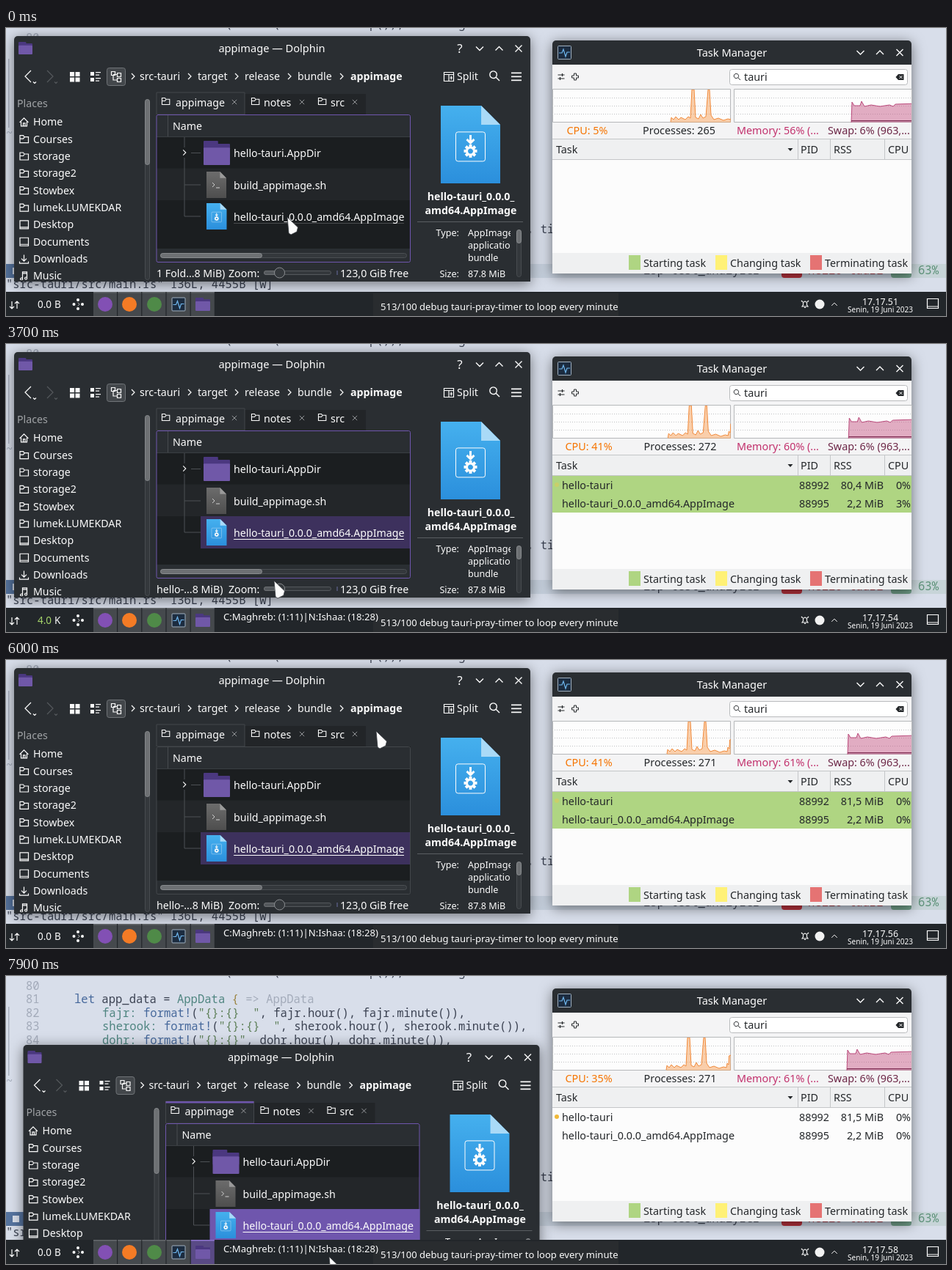
Animation of 1280x393 px, one loop 8000 ms. Source, as an HTML page with a canvas:

```html
<!DOCTYPE html>
<html lang="en">
<head>
<meta charset="utf-8">
<title>Prayer timer on the desktop</title>
<style>
html, body { margin: 0; width: 1280px; height: 393px; overflow: hidden; }
canvas { display: block; }
</style>
</head>
<body>
<canvas id="stage" width="1280" height="393"></canvas>
<script>
const g = document.getElementById('stage').getContext('2d');
const LOOP = 8000, STEP = 100;
const WHITE = '#fcfcfc', INK = '#232629', DARK = '#2a2e32', ACCENT = '#6f56ad';

// ---- drawing helpers ----
function rect(x, y, w, h, fill, stroke, r = 0) {
  g.beginPath();
  g.roundRect(x, y, w, h, r);
  if (fill) { g.fillStyle = fill; g.fill(); }
  if (stroke) { g.strokeStyle = stroke; g.lineWidth = 1; g.stroke(); }
}
function circle(x, y, r, fill, stroke) { rect(x - r, y - r, 2 * r, 2 * r, fill, stroke, r); }
function path(d, x, y, stroke, fill, w = 1.2, scale = 1) {
  const p = new Path2D(d);
  g.save();
  g.translate(x, y);
  g.scale(scale, scale);
  if (fill) { g.fillStyle = fill; g.fill(p); }
  if (stroke) { g.strokeStyle = stroke; g.lineWidth = w; g.stroke(p); }
  g.restore();
}
function text(s, x, y, color = WHITE, size = 14.2, align = 'left', weight = 400, family = '"Noto Sans", sans-serif') {
  g.font = `${weight} ${size}px ${family}`;
  g.textAlign = align;
  g.fillStyle = color;
  g.fillText(s, x, y);
}
function clipped(x, y, w, h, draw) {
  g.save();
  g.beginPath();
  g.rect(x, y, w, h);
  g.clip();
  draw();
  g.restore();
}
function windowFrame(x, y, w, h, fill) {
  g.save();
  g.shadowColor = 'rgba(0,0,0,.5)';
  g.shadowBlur = 18;
  g.shadowOffsetY = 3;
  rect(x, y, w, h, fill, null, [5, 5, 0, 0]);
  g.restore();
}
function polyline(pts, shift, base, stroke, fill) {
  g.beginPath();
  pts.forEach(([x, y]) => g.lineTo(x - shift, y));
  g.strokeStyle = stroke;
  g.lineWidth = 1;
  g.stroke();
  g.lineTo(pts.at(-1)[0] - shift, base);
  g.lineTo(pts[0][0] - shift, base);
  g.fillStyle = fill;
  g.fill();
}

// ---- timing helpers ----
function tween(keys, t) {
  const i = keys.findIndex(k => k[0] > t);
  if (i === 0) return keys[0].slice(1);
  if (i < 0) return keys.at(-1).slice(1);
  const a = keys[i - 1], b = keys[i], f = (t - a[0]) / (b[0] - a[0]);
  return [1, 2].map(n => a[n] + (b[n] - a[n]) * f);
}
const latest = (rows, t) => rows.findLast(r => r[0] <= t);

const POINTER = [[400, 383, 258], [1000, 366, 241], [3600, 366, 241], [3700, 365, 323], [4200, 372, 371],
  [5500, 372, 371], [6000, 504, 97], [6400, 488, 24], [7400, 498, 108], [7900, 440, 383]];
const DRAG = [[6800, 0, 0], [6900, 0, 14.5], [7300, 12.5, 83]];
// time, CPU %, processes, memory %, graph scroll
const LOAD = [[0, 5, 265, 56, 0], [800, 13, 266, 60, 1.5], [2000, 27, 269, 60, 2.5], [3100, 41, 272, 60, 3.7],
  [4500, 38, 272, 60, 4.4], [5200, 38, 272, 60, 4.8], [5900, 41, 271, 61, 5], [6800, 35, 271, 61, 5.4], [7500, 35, 271, 61, 6]];
const CPU = [[905, 128], [906, 122], [909, 125], [912, 121], [916, 125], [919, 122], [925, 125], [929, 121], [932, 123],
  [934, 84], [937, 84], [939, 122], [943, 124], [946, 118], [949, 123], [953, 121], [956, 84], [958, 84], [960, 119],
  [964, 125], [970, 123], [977, 126], [983, 124], [987, 125], [988, 119], [990, 121], [990.5, 109], [993, 108]];
const MEMORY = [[1151, 129], [1152, 101], [1155, 106], [1163, 106], [1165, 100], [1169, 107], [1178, 105],
  [1190, 107], [1203, 105], [1208, 107], [1211, 104], [1242, 103]];
const NOTE = 'C:Maghreb: (1:11)|N:Ishaa: (18:28)';
const TIMES = ['4:20   fajr', '5:35   sherook', '11:24 dohr', '14:44 asr', '17:13 maghreb', '18:28 ishaa'];

// ---- icons ----
const FOLDER = 'M.5 10.5V.5H5L6.5 2.5H12V10.5ZM.5 5H5L6.5 3';
const PLACES = [
  ['Home', 'M0 6L6 0L12 6M2 5V11H10V5M5 11V7H7.500V11'], ['Courses', FOLDER], ['storage', FOLDER], ['storage2', FOLDER],
  ['Stowbex', FOLDER], ['lumek.LUMEKDAR', FOLDER], ['Desktop', 'M.5 0H12V11H.5ZM.5 9H12'], ['Documents', 'M.5 0H12V11H.5ZM.5 9H12'],
  ['Downloads', 'M6 0V8M2.500 5L6 8.500L9.500 5M0 9V11.500H12V9'], ['Music', 'M4 9V0H10V8M4 2H10M4 9A1.500 1.500 0 1 1 3.900 8.800M10 8A1.500 1.500 0 1 1 9.900 7.800']];
const DOWN = 'M-5 -2.500L0 2.500L5 -2.500', UP = 'M-5 2.500L0 -2.500L5 2.500', RIGHT = 'M-2 -4L2 0L-2 4';
const CROSS = 'M-4.500 -4.500L4.500 4.500M4.500 -4.500L-4.500 4.500';
const LENS = 'M1 1L5 5M2 -2A4 4 0 1 1 1.990 -2.200';

function purpleFolder(x, y, w, h) {
  rect(x, y, w * .55, h * .4, '#4b3880', null, 1);
  rect(x, y + h * .12, w, h * .5, '#4b3880', null, 1);
  rect(x, y + h * .28, w, h * .72, '#7058a8', null, 1);
}
function document_(x, y, w, h, top, bottom, fold) {
  const f = w * .32, c = g.createLinearGradient(0, 0, 0, h);
  c.addColorStop(0, top);
  c.addColorStop(1, bottom);
  path(`M0 0H${w - f}L${w} ${f}V${h}H0Z`, x, y, null, c);
  path(`M${w - f} 0V${f}H${w}Z`, x, y, null, fold);
}
function packageIcon(x, y, w) {
  document_(x, y, w, w * 1.31, '#45b0ee', '#2b8fdc', '#a9daf7');
  g.save();
  g.translate(x + w / 2, y + w * .69);
  g.scale(w / 81, w / 81);
  rect(-20, -20, 40, 40, null, WHITE, 3);
  path('M0 -16V-7M-5 -10L0 -5L5 -10', 0, 0, WHITE, null, 3);
  for (let i = 0; i < 8; i++) {
    g.save();
    g.translate(0, 6);
    g.rotate(i * Math.PI / 4);
    rect(-2, -9, 4, 5, WHITE);
    g.restore();
  }
  path('M5 0A5 5 0 1 1 4.990 -.2', 0, 6, WHITE, null, 3);
  g.restore();
}
function pulseIcon(x, y) {
  rect(x + .5, y + .5, 18, 18, '#1c2c40', '#9fb0c0', 1);
  path('M2 10H6L8 5L11 15L13 9H17', x, y, '#6fb7ee');
}
function titleButtons(xs, y) {
  [DOWN, UP, CROSS].forEach((d, i) => path(d, xs[i], y, WHITE, null, 1.4));
}

// ---- scene parts ----
function editor() {
  const CELL = 9.33, mono = '"Noto Sans Mono", monospace';
  const code = (x, y, ...runs) => runs.forEach(([s, c]) => {
    text(s, x, y, c, 15.55, 'left', 400, mono);
    x += s.length * CELL;
  });
  const ink = '#3b4252', num = '#a3abba', field = '#4f8580', macro = '#46689b', str = '#5d7f58';
  rect(0, 0, 1280, 393, '#d8deea');
  code(299, -.5, ['(      (             p());        g', ink]);
  for (let n = 80; n < 85; n++) code(27, 18.500 + (n - 80) * 18.600, [String(n), num]);
  code(93, 37, ['let ', macro], ['app_data = ', ink], ['AppData ', field], ['{ ', '#9a8340'], ['=> AppData', num]);
  ['fajr', 'sherook', 'dohr'].forEach((name, i) =>
    code(131, 55.700 + i * 18.600, [name + ': ', field], ['format!', macro], ['(', ink], [i < 2 ? '"{}:{}  "' : '"{}:{}"', str],
      [`, ${name}.hour(), ${name}.minute()),`, ink]));
  rect(3, 42, 1.500, 94, '#a9b0bf');
  code(0, 149, ['~', num]);
  code(709, 280, [', time', ink]);
  rect(0, 322, 1280, 19, '#c5cfdc');
  rect(0, 322, 26, 19, '#56749f');
  rect(9, 327, 9, 9, '#d8deea');
  code(868, 336, ['lsp test_analyzer', ink]);
  rect(1056, 322, 28, 19, '#b5313c', null, 4);
  code(1092, 336, ['hello-tauri', '#9b3540']);
  rect(1205, 322, 28, 19, '#6f9c87', null, 4);
  rect(1233, 322, 47, 19, '#c7d4d8');
  code(1242, 336, ['63%', '#5d9279']);
  code(0, 355, ['"src-tauri/src/main.rs" 136L, 4455B [w]', ink]);
}

function fileManager(t, active) {
  const accent = active ? ACCENT : '#6d7073', selected = t >= 1300, hovered = t >= 600 && t < 3700;
  windowFrame(11, 11, 703, 335, DARK);
  purpleFolder(17, 19, 19, 17);
  text('appimage — Dolphin', 362, 33, WHITE, 14.6, 'center');
  text('?', 618, 34, WHITE, 17, 'center');
  titleButtons([645, 671.500, 698], 28);

  path('M4 -8L-4 0L4 8', 30, 66, WHITE);
  path('M-4 -8L4 0L-4 8', 60, 66, '#55595d');
  path('M-2 -1L0 1L2 -1', 39, 74.500, WHITE);
  path('M-2 -1L0 1L2 -1', 68, 74.500, '#55595d');
  for (const [x, y] of [[87, 60], [94.500, 60], [87, 67.500], [94.500, 67.500]]) rect(x, y, 6, 6, WHITE);
  for (const y of [60, 68]) {
    rect(115, y, 5, 5, WHITE);
    rect(122, y, 7, 1.200, WHITE);
    rect(122, y + 3.500, 5, 1.200, WHITE);
  }
  rect(137.500, 54.500, 25, 24, '#43474b', '#707478', 3);
  path('M0 0H5V5H0ZM8 2H13V7H8ZM8 9H13V14H8ZM2.500 5V11.500H8M2.500 4H8', 143.500, 59.500, WHITE);
  for (const x of [173, 250, 314, 386, 457]) path(RIGHT, x, 66, WHITE);
  [['src-tauri', 182], ['target', 261], ['release', 325], ['bundle', 397]].forEach(([s, x]) => text(s, x, 71));
  text('appimage', 469, 71, WHITE, 14.2, 'left', 700);
  path('M0 0H13V12H0ZM0 3H13M6.500 3V12M9.800 5V10M8 7.500H11.500', 596.500, 60.500, WHITE);
  text('Split', 614, 71);
  path(LENS, 666, 66, WHITE, null, 1.2, 1.2);
  for (const y of [60.500, 65.500, 70.500]) rect(688, y, 14, 1.700, WHITE);

  clipped(11, 88, 178, 256, () => {
    text('Places', 15, 108, '#a0a3a6');
    PLACES.forEach(([name, icon], i) => {
      const y = 128.300 + i * 23.350;
      path(icon, 18.500, y - 5.500, WHITE);
      text(name, 37, y + 5);
    });
  });
  rect(189.500, 97.500, 6, 246, '#34383c', '#484c50', 3);
  rect(189.500, 97.500, 6, 89, '#6d7073', '#85888b', 3);

  rect(325, 90, 165, 28, '#222528');
  rect(205, 88, 120, 30, DARK, '#43474b');
  if (active) rect(205, 88, 120, 2.500, ACCENT);
  [['appimage', 212, 231, 311], ['notes', 334, 351, 403], ['src', 425, 442, 475]].forEach(([s, icon, x, close]) => {
    path(FOLDER, icon, 95, WHITE, null, 1.2, .9);
    text(s, x, 107);
    path(CROSS, close, 101, '#a0a3a6', null, 1.3, .7);
  });

  rect(205, 118, 346, 202, '#1b1e20');
  rect(205, 119, 346, 29, DARK);
  rect(220, 119, 1, 29, '#484c50');
  rect(205, 148, 346, 1, '#3a3e42');
  text('Name', 227, 139);
  rect(205, 191.500, 346, 43.500, '#232629');
  if (selected) rect(265, 235, 286, 44, active ? ACCENT : '#3d315d');
  rect(205, 301, 346, 19, DARK);
  path('M243 149V163M243 177V257H265M243 214H265M252 170.500H265', 0, 0, '#4d5155', null, 1);
  path(RIGHT, 243, 170, WHITE, null, 1.2, .9);
  purpleFolder(269, 154, 36, 33);
  document_(273, 196, 27, 36, '#6c6c6c', '#4e4e4e', '#9a9a9a');
  path('M0 0L3 3L0 6M5 7H10', 281, 211, '#d0d0d0', null, 1);
  packageIcon(273, 239, 27.500);
  if (selected && active && hovered) {
    rect(273, 239, 27.500, 36, 'rgba(255,255,255,.22)');
    rect(267, 239, 18, 16, 'rgba(120,135,150,.85)', null, 2);
    rect(271, 246, 10, 1.500, WHITE);
  }
  text('hello-tauri.AppDir', 310, 176);
  text('build_appimage.sh', 310, 219.500);
  text('hello-tauri_0.0.0_amd64.AppImage', 310, 263);
  rect(310, 266, 232, 1, selected ? WHITE : 'rgba(255,255,255,.2)');
  rect(210.500, 307.500, 335, 6, '#34383c', '#4b4f53', 3);
  rect(210.500, 307.500, 138, 6, active ? ACCENT : '#6d7073', active ? '#8a72c6' : '#898c8f', 3);
  rect(205, 118.500, 345.500, 201, null, active || t < 3800 ? ACCENT : '#43474b', 2);

  text(t < 600 ? '1 Fold...8 MiB)' : 'hello-...8 MiB)', 205, 340);
  text('Zoom:', 303, 340);
  rect(351.500, 331.500, 91, 5, '#34383c', '#54585c', 3);
  rect(351.500, 331.500, 18, 5, active ? ACCENT : '#54585c', accent, 3);
  circle(372.500, 334, 7, '#34383c', '#8a8d90');
  rect(450, 331, 2, 6, '#4a4e6a');
  text('123,0 GiB free', 455, 340);

  packageIcon(592, 106, 81);
  text('hello-tauri_0.0.0_', 633, 235, WHITE, 14.2, 'center', 700);
  text('amd64.AppImage', 633, 254, WHITE, 14.2, 'center', 700);
  rect(560, 264, 144, 1, '#5a5e62');
  clipped(560, 266, 127, 74, () => {
    text('Type:', 617, 284, WHITE, 12.6, 'right');
    ['AppImage', 'application', 'bundle'].forEach((s, i) => text(s, 629, 284 + i * 17, WHITE, 12.6));
    text('Size:', 617, 340, WHITE, 12.6, 'right');
    text('87.8 MiB', 629, 340, WHITE, 12.6);
  });
  rect(695.500, 275.500, 6, 64, '#34383c', '#484c50', 3);
  rect(695.500, 275.500, 6, 18, '#6d7073', '#898c8f', 3);
}

function taskManager(t) {
  const [, cpu, processes, memory, shift] = latest(LOAD, t), S = 14.35;
  windowFrame(744, 17, 489, 318, DARK);
  rect(744, 50, 489, 285, '#f4f4f5');
  pulseIcon(751, 24);
  text('Task Manager', 988.500, 39, WHITE, 14.6, 'center');
  titleButtons([1163.500, 1190, 1217], 33.500);
  path('M0 2H9M6 0V4M0 7H9M3 5V9', 751.500, 62, INK);
  path('M3 0H6V3H9V6H6V9H3V6H0V3H3Z', 770.500, 62, INK, null, 1);
  rect(985.500, 56.500, 242, 21, '#fff', '#b9bbbd', 3);
  path(LENS, 996, 67, INK, null, 1.2, .8);
  text('tauri', 1005, 72, INK, S);
  path('M0 4L3.500 0H11V8H3.500Z', 1211.500, 63, null, INK);
  path('M-2 -2L2 2M2 -2L-2 2', 1218.500, 67, '#fff', null, 1);

  for (const x of [744, 991]) {
    rect(x + .5, 83.500, 242, 45, '#fdfdfd', '#b5b7b9');
    g.setLineDash([1, 2]);
    for (const y of [95.500, 106.500, 117.500]) path('M0 0H242', x, y, '#bfc1c3', null, 1);
    g.setLineDash([]);
  }
  clipped(745, 84, 242, 45, () => polyline(CPU, shift, 129, '#f0883a', 'rgba(244,150,70,.45)'));
  clipped(992, 84, 241, 45, () => {
    polyline(MEMORY, shift, 129, '#b8487a', 'rgba(194,84,130,.48)');
    rect(1151 - shift, 126, 90, 1.300, '#7d2a50');
  });
  text(`CPU: ${cpu}%`, cpu < 10 ? 791.500 : 793.500, 145, '#f67400', S, 'center');
  text(`Processes: ${processes}`, cpu < 10 ? 916.500 : 918, 145, INK, S, 'center');
  text(`Memory: ${memory}% (...`, 995, 145, '#c2316d', S);
  text('Swap: 6% (963,...', 1119, 145, '#6d2747', S);

  rect(744, 151, 489, 29, '#eff0f1');
  rect(744, 151, 489, 1, '#c4c6c8');
  rect(744, 179, 489, 1, '#c4c6c8');
  rect(744, 180, 489, 127, '#fcfcfc');
  for (const x of [1078, 1122, 1196]) rect(x, 152, 1, 28, '#c4c6c8');
  [['Task', 749], ['PID', 1082], ['RSS', 1127], ['CPU', 1201]].forEach(([s, x]) => text(s, x, 171, INK, S));
  path('M-3.500 -2H3.500L0 2Z', 1068, 166, null, INK);
  if (t >= 3100) {
    const settled = t >= 4500;
    if (t < 6800) rect(744, 180, 489, 50, '#afd582');
    circle(750, 192, 3, t < 6800 ? '#c9cf6a' : '#f0b93a');
    [['hello-tauri', '88992', settled ? '81,5 MiB' : '80,4 MiB', '0%'],
      ['hello-tauri_0.0.0_amd64.AppImage', '88995', '2,2 MiB', settled ? '0%' : '3%']].forEach(([name, ...cells], i) => {
      const y = 198 + i * 24.500;
      text(name, 757, y, INK, S);
      cells.forEach((s, n) => text(s, [1121, 1195, 1232][n], y, INK, S, 'right'));
    });
  }
  rect(744, 307, 489, 28, '#eff0f1');
  [['Starting', 848, '#afd582'], ['Changing', 966, '#fff176'], ['Terminating', 1095, '#e57373']].forEach(([s, x, c]) => {
    rect(x, 310, 16, 20, c);
    text(s + ' task', x + 20, 325.500, INK, S);
  });
}

function panel(t, active) {
  rect(0, 360, 1280, 33, '#22262a');
  path('M3 0V10M0 7L3 10L6 7M10 10V0M7 3L10 0L13 3', 5, 373, WHITE);
  const busy = t >= 3100 && t < 4200;
  text(busy ? '4.0' : '0.0', 43, 382, busy ? '#a5d46a' : WHITE, 13.5);
  text(busy ? 'K' : 'B', 66, 382, WHITE, 13.5);
  for (const [x, y] of [[98, 371], [92.500, 377], [98, 383], [104, 377]]) circle(x, y, 2, WHITE);
  path(RIGHT, 99, 377, WHITE, null, 1.2, .6);
  for (let i = 0; i < 5; i++) {
    const on = active && i === 4, x = 119 + i * 33.200;
    rect(x, 360, 32, 33, on ? '#594a85' : '#45494d');
    rect(x, 360, 32, 1.500, on ? '#8f75d0' : '#64686c');
  }
  circle(135, 377, 10, '#8250b4');
  circle(168, 377, 10, '#f47b25');
  circle(202, 377, 10, '#4f8a48');
  pulseIcon(225.500, 367.500);
  purpleFolder(258, 368, 20, 18);
  rect(500, 362, 334, 31, '#292c2f');
  if (t >= 2300) text(NOTE, 296, 377, WHITE, 13.1);
  clipped(504, 362, 329.500, 31, () => text('513/100 debug tauri-pray-timer to loop every minute', 510, 384.500, WHITE, 13.05));
  path('M1 8L2.500 6V3Q5 -1 7.500 3V6L9 8ZM4 9.500H6M0 0L2 2M10 0L8 2', 1083, 372, WHITE, null, 1.1);
  circle(1108, 377, 6.500, '#f2f2f2');
  path(UP, 1128, 377, WHITE, null, 1.3, .75);
  text(`17.17.${51 + Math.floor((t + 50) / 1050)}`, 1190.500, 377.500, WHITE, 12.35, 'center');
  text('Senin, 19 Juni 2023', 1190.500, 387.500, WHITE, 10.05, 'center');
  path('M0 0H15V13H0ZM0 10.500H15', 1254.500, 369.500, WHITE);
}

function tooltip() {
  rect(267.500, 177.500, 249.500, 182, 'rgba(5,6,7,.9)', 'rgba(70,74,78,.7)', 3);
  TIMES.forEach((s, i) => text(s, 276.500, 201.500 + i * 20.700));
  text(NOTE, 276.500, 346, WHITE, 14.3);
}

function pointer(t, dx, dy) {
  if (t >= 6800 && t <= 7400) {
    g.save();
    g.translate(486 + dx, 25.500 + dy);
    for (let i = 0; i < 4; i++) {
      path('M0 -17L6 -9L3 -6H-3L-6 -9Z', 0, 0, INK, WHITE, 1.5);
      g.rotate(Math.PI / 2);
    }
    circle(0, 0, 4, WHITE, INK);
    g.restore();
    return;
  }
  const [x, y] = tween(POINTER, t);
  if (y > 363 && y < 382) path('M-3 -6H3M0 -6V6M-3 6H3', x, y, WHITE, null, 1.3);
  else path('M0 0L14.500 14L13 20L5 24L2 22Z', x, y, '#33373b', WHITE, .8);
}

function frame(now) {
  const t = Math.floor(now % LOOP / STEP) * STEP;
  const active = t >= 1300 && t < 2000 || t >= 6800;
  const [dx, dy] = tween(DRAG, t);
  editor();
  g.save();
  g.translate(dx, dy);
  fileManager(t, active);
  g.restore();
  taskManager(t);
  panel(t, active);
  if (t >= 4700 && t < 5700) tooltip();
  pointer(t, dx, dy);
}

const start = performance.now();
function loop() {
  frame(performance.now() - start);
  requestAnimationFrame(loop);
}
loop();
</script>
</body>
</html>
```
